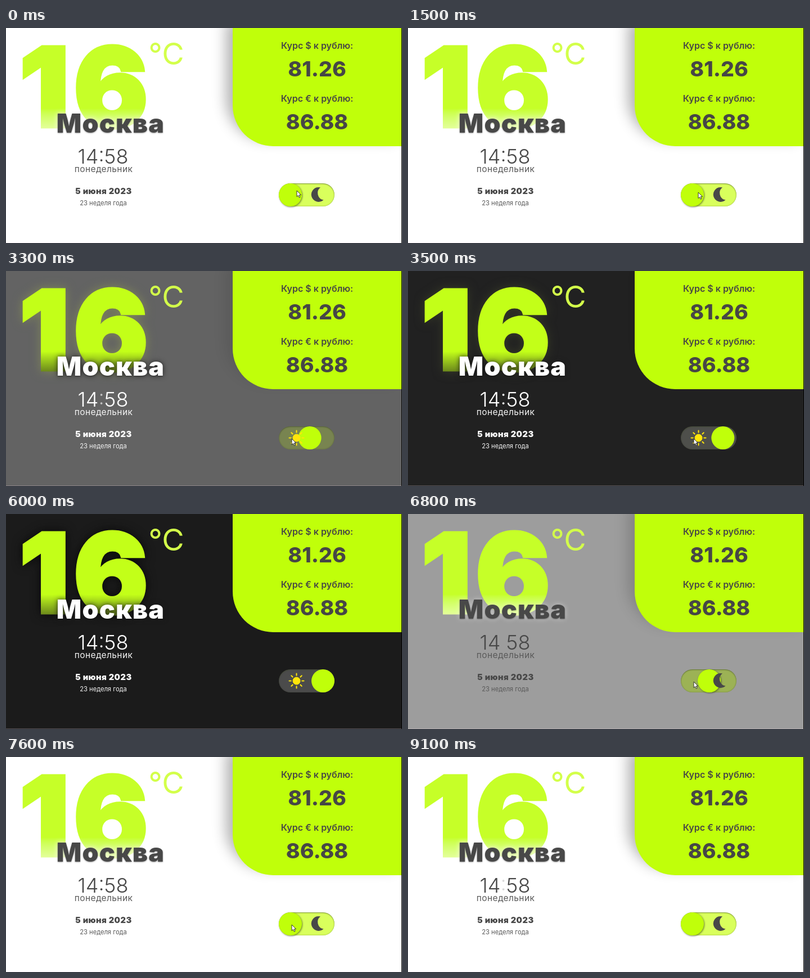
Animation, 704 px wide and 382 px high, one loop 9.2 s. Source, as an HTML page:

```html
<!DOCTYPE html>
<html lang="ru">
<head>
<meta charset="utf-8">
<title>Погода и курс</title>
<style>
  html, body { margin: 0; width: 100%; height: 100%; overflow: hidden; }
  #stage {
    --ink: #484848; --soft: #5a5a5a; --lime: #c6ff28; --halo: #fff;
    position: relative; width: 704px; height: 382px; overflow: hidden; background: var(--bg);
  }
  #stage.dark { --ink: #fff; --soft: #f4f4f4; --lime: #c3ff18; --halo: #1b1b1b; }
  #stage > * { position: absolute; }
  .panel {
    left: 403px; top: 0; width: 300px; height: 210px;
    background: #c0ff0a; border-radius: 0 0 0 72px;
    box-shadow: -12px -12px 24px rgba(0, 0, 0, var(--shade));
  }
  .toggle {
    left: 485px; top: 276px; width: 99px; height: 41px; border-radius: 21px;
    background: var(--track);
    box-shadow: inset 0 1px 2px rgba(60, 70, 40, .6), inset 0 -1px 2px rgba(60, 70, 40, .15);
  }
  .knob {
    left: 485px; top: 276px; width: 41px; height: 41px; border-radius: 50%;
    background: #c0ff0a; transform: translateX(var(--shift));
    box-shadow: 1px 1px 3px rgba(50, 60, 20, .65);
  }
  .dark .knob { box-shadow: none; }
  .edge { right: 0; top: 0; width: 1px; height: 382px; background: #000; }
  .floor { left: 0; bottom: 0; width: 703px; height: 1px; background: rgba(255, 225, 240, .25); }
  svg { left: 0; top: 0; }
  text { font-family: Inter, "Open Sans", sans-serif; text-anchor: middle; fill: var(--ink); }
  .temp { font-size: 197px; font-weight: 900; filter: drop-shadow(0 0 9px var(--glow)); }
  .temp text { fill: url(#fade); stroke: url(#fade); stroke-width: 5px; }
  .near { stop-color: var(--lime); }
  .far { stop-color: color-mix(in srgb, var(--lime) 45%, var(--halo)); }
  .unit { font-size: 54px; font-weight: 400; fill: #d3ff4a; }
  .city {
    font-size: 46.5px; font-weight: 900; letter-spacing: 1.2px;
    filter: drop-shadow(0 1px 1px rgba(0, 0, 0, .35)) drop-shadow(0 0 5px var(--halo-soft));
  }
  .clock { font-size: 36px; font-weight: 300; }
  .day { font-size: 15.5px; letter-spacing: .4px; fill: var(--soft); }
  .date { font-size: 14.6px; font-weight: 900; letter-spacing: .5px; }
  .week { font-size: 11.2px; fill: var(--soft); }
  .label { font-size: 16px; font-weight: 600; fill: #464646; }
  .rate { font-size: 37.5px; font-weight: 800; fill: #464646; }
  .moon { fill: #484848; }
  .sun { fill: #ffe60a; stroke: #ffe60a; }
  .dark .moon, #stage:not(.dark) .sun { display: none; }
</style>
</head>
<body>
<div id="stage">
  <div class="panel"></div>
  <div class="toggle"></div>
  <div class="knob"></div>
  <div class="edge"></div>
  <div class="floor"></div>
  <svg width="704" height="382">
    <defs>
      <linearGradient id="fade" gradientUnits="userSpaceOnUse" x1="0" y1="143" x2="0" y2="181">
        <stop class="near"/>
        <stop class="far" offset="1"/>
      </linearGradient>
    </defs>
    <g class="temp"><text x="68" y="176">1</text><text x="186.5" y="176">6</text></g>
    <text class="unit" x="285" y="64.5">°C</text>
    <text class="city" x="186" y="186">Москва</text>
    <text class="clock" x="172.5" y="240.5">14<tspan id="colon">:</tspan>58</text>
    <text class="day" x="173.5" y="255.5">понедельник</text>
    <text class="date" x="173.5" y="294.5">5 июня 2023</text>
    <text class="week" x="173" y="314.5">23 неделя года</text>
    <text class="label" x="553" y="36.5">Курс $ к рублю:</text>
    <text class="rate" x="553" y="85.5">81.26</text>
    <text class="label" x="553" y="131">Курс € к рублю:</text>
    <text class="rate" x="553" y="179.5">86.88</text>
    <path class="moon" d="M559 283.3A13 13 0 1 0 564.5 305.5A12.5 12.5 0 0 1 559 283.3Z"/>
    <g class="sun" transform="translate(516.5 296.5)">
      <circle r="6.5"/>
      <path id="rays" stroke-width="2" stroke-linecap="round"/>
    </g>
    <path id="cursor" d="M0 0V10.6L2.5 8.4L4.2 12.2L6 11.4L4.3 7.7H7.6Z" fill="#fff" stroke="#222" stroke-width=".9"/>
  </svg>
</div>
<script>
  const LOOP = 9200, STEP = 100;
  const TO_DARK = 3100, TO_LIGHT = 6635, FADE = 500, SLIDE = 580;
  const $ = id => document.getElementById(id);
  const stage = $('stage');

  const clamp = x => Math.min(1, Math.max(0, x));
  const lerp = (a, b, p) => a + (b - a) * p;
  const mix = (a, b, p) => `rgb(${a.map((v, i) => Math.round(lerp(v, b[i], p)))})`;

  // The CSS "ease" curve, solved by bisection.
  function ease(x) {
    x = clamp(x);
    const bezier = (a, b, u) => 3 * a * u * (1 - u) ** 2 + 3 * b * u * u * (1 - u) + u ** 3;
    let low = 0, high = 1;
    for (let i = 0; i < 20; i++) {
      const mid = (low + high) / 2;
      if (bezier(.25, .25, mid) < x) low = mid; else high = mid;
    }
    return bezier(.1, 1, low);
  }

  function drawTheme(t) {
    const dark = t > TO_DARK && t < TO_LIGHT;
    const darkness = duration => ease((t - TO_DARK) / duration) - ease((t - TO_LIGHT) / duration);
    const p = darkness(FADE);
    const glow = ease((t - TO_DARK) / 900);
    const set = (name, value) => stage.style.setProperty(name, value);
    stage.classList.toggle('dark', dark);
    set('--bg', mix([255, 255, 255], [27, 27, 27], p));
    set('--track', mix([217, 255, 92], [75, 75, 75], p));
    set('--shift', 58 * darkness(SLIDE) + 'px');
    set('--shade', .3 * (1 - p));
    set('--glow', dark ? mix([190, 200, 130], [8, 8, 8], glow) : 'transparent');
    set('--halo-soft', dark ? 'rgba(20, 20, 20, .8)' : `rgba(255, 255, 255, ${.8 * (1 - p)})`);
  }

  function drawColon(t) {
    const phase = t % 2000;
    $('colon').style.opacity = phase < 1000 ? 1 - clamp(phase / 500) : clamp((phase - 1000) / 500);
  }

  function drawCursor(t) {
    const drift = clamp(t / 500), move = ease((t - 2050) / 400);
    const x = lerp(lerp(517, 516, drift), 508, move);
    const y = lerp(lerp(289, 292, drift), 298, move);
    $('cursor').setAttribute('transform', `translate(${x} ${y})`);
    $('cursor').style.display = t < 5300 || (t >= 6200 && t < 8300) ? '' : 'none';
  }

  $('rays').setAttribute('d', Array.from({ length: 8 }, (_, i) => {
    const c = Math.cos(i * Math.PI / 4), s = Math.sin(i * Math.PI / 4);
    return `M${9.8 * c} ${9.8 * s}L${13 * c} ${13 * s}`;
  }).join(''));

  const start = performance.now();
  function frame() {
    const t = Math.floor((performance.now() - start) % LOOP / STEP) * STEP;
    drawTheme(t);
    drawColon(t);
    drawCursor(t);
    requestAnimationFrame(frame);
  }
  frame();
</script>
</body>
</html>
```
